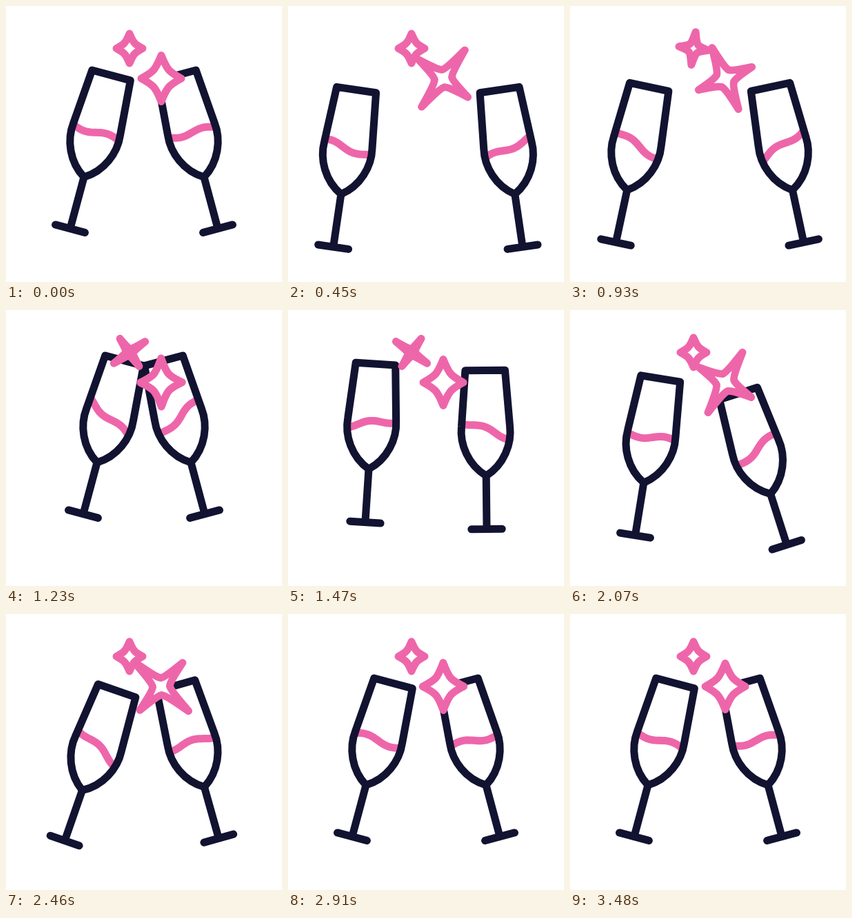
An HTML page for the animation above (3660 ms loop, 400 px wide and 400 px high).

```html
<!DOCTYPE html>
<html lang="en">
<head>
<meta charset="utf-8">
<title>Cheers</title>
<style>
  html, body { margin: 0; width: 100%; height: 100%; overflow: hidden; background: #fff; }
  svg { display: block; width: 100vw; height: 100vh; }
  path { stroke-width: 11; stroke-linecap: round; stroke-linejoin: round; fill: none; }
  .glass { stroke: #121331; }
  .wave { stroke: #ee66aa; }
  .star { stroke: #ee66aa; fill: #fff; }
</style>
</head>
<body>
<svg viewBox="0 0 400 400">
  <defs>
    <path id="bowl" d="M0 0C-26 -16 -38 -46 -35 -72L-28.8 -152.8H28.8L35 -72C38 -46 26 -16 0 0Z"/>
    <clipPath id="inside"><use href="#bowl"/></clipPath>
    <g id="glass" class="glass">
      <use href="#bowl"/>
      <path d="M0 0V77.3M-22.2 77.3H22.2"/>
    </g>
  </defs>
  <g id="left">
    <g clip-path="url(#inside)"><path class="wave"/></g>
    <use href="#glass"/>
  </g>
  <g transform="translate(400) scale(-1 1)">
    <g id="right">
      <g clip-path="url(#inside)"><path class="wave"/></g>
      <use href="#glass"/>
    </g>
  </g>
  <path id="big" class="star"/>
  <path id="small" class="star"/>
</svg>
<script>
const LOOP = 3660, STEP = 30, END = 3480;
const SPREAD = 555, CLINK = 1230, BACK = 1710, OVER = 2340, SETTLED = 2800;
const $ = id => document.getElementById(id);

const progress = (t, from, to) => Math.min(1, Math.max(0, (t - from) / (to - from)));
const mix = (a, b, k) => a + (b - a) * k;
const smooth = u => u * u * (3 - 2 * u);
const smoother = u => u * u * u * (u * (6 * u - 15) + 10);
const strike = u => Math.pow(u, 3.4);
const spin = u => {
  const half = v => Math.pow(2 * v, 2.4) / 2;
  return u < 0.5 ? half(u) : 1 - half(1 - u);
};

// The right glass is in mirrored space; it opens wider and swings back faster.
const glasses = [
  { id: "left", dir: 1, wide: 0, pace: 1, drop: 0, level: 4 },
  { id: "right", dir: -1, wide: 6, pace: 1.19, drop: 11, level: -2 }
];

function pose(g, t) {
  const rest = { x: 113, y: 248, angle: 15, tilt: g.level };
  const spread = { x: 75 - g.wide, y: 274, angle: 8, tilt: 12 + g.wide };
  const clink = { x: 132, y: 221, angle: 15, tilt: 28 };
  const back = { x: 102, y: 240 + g.drop, angle: -7.5, tilt: -46 };
  const over = { x: 110, y: 257 + g.drop, angle: 20, tilt: 30 };
  const move = (a, b, from, to, ease, turn = ease) => {
    const u = progress(t, from, to), k = ease(u), r = turn(u);
    return {
      x: mix(a.x, b.x, k), y: mix(a.y, b.y, k),
      angle: mix(a.angle, b.angle, r), tilt: mix(a.tilt, b.tilt, r)
    };
  };
  if (t < SPREAD) return move(rest, spread, 0, SPREAD, smoother);
  if (t < CLINK) return move(spread, clink, SPREAD, CLINK, strike, smooth);
  t = CLINK + (t - CLINK) * g.pace;
  if (t < BACK) return move(clink, back, CLINK, BACK, smooth);
  if (t < OVER) return move(back, over, BACK, OVER, smooth);
  return move(over, rest, OVER, SETTLED, smooth);
}

function drawGlass(g, t) {
  const p = pose(g, t), u = t / END;
  const phase = 8 * Math.PI * (u + 0.16 * Math.sin(Math.PI * u) ** 2);
  let d = "";
  for (let x = -60; x <= 60; x += 3) {
    const y = 3.4 * g.dir * Math.sin(2 * Math.PI * (x / 68 + 0.5) + g.dir * phase);
    d += (d ? "L" : "M") + x + " " + y.toFixed(2);
  }
  const node = $(g.id), wave = node.querySelector(".wave");
  node.setAttribute("transform", `translate(${p.x} ${p.y}) rotate(${p.angle})`);
  wave.setAttribute("d", d);
  wave.setAttribute("transform", `translate(0 -67) rotate(${p.tilt})`);
}

const stars = [
  { id: "big", x: 225, y: 105, rx: 29, ry: 33.5, waist: 11.7, pinch: 3.2, grow: 0.65, starts: [0, 1660] },
  { id: "small", x: 179, y: 61.5, rx: 19, ry: 21.5, waist: 7.6, pinch: 4.5, grow: 0.3, starts: [700] }
];

// Each spin is half a turn while the points stretch and the waist tightens.
function drawStar(s, t) {
  const start = s.starts.filter(v => v <= t).pop() ?? s.starts[0];
  const u = progress(t, start, start + 1300);
  const stretch = Math.max(0, Math.sin(Math.PI * u)) ** 1.5;
  const k = 1 + s.grow * stretch, rx = s.rx * k, ry = s.ry * k;
  const w = s.waist - s.pinch * stretch, near = w * 0.58, far = w * 1.42;
  const side = (sx, sy, fromTip) => fromTip
    ? `Q${sx * near} ${sy * far} ${sx * w} ${sy * w}Q${sx * far} ${sy * near} ${sx * rx} 0`
    : `Q${sx * far} ${sy * near} ${sx * w} ${sy * w}Q${sx * near} ${sy * far} 0 ${sy * ry}`;
  const node = $(s.id);
  node.setAttribute("d", `M0 ${-ry}` + side(1, -1, true) + side(1, 1, false)
    + side(-1, 1, true) + side(-1, -1, false) + "Z");
  node.setAttribute("transform", `translate(${s.x} ${s.y}) rotate(${180 * spin(u)})`);
}

function draw(t) {
  glasses.forEach(g => drawGlass(g, t));
  stars.forEach(s => drawStar(s, t));
}

const origin = performance.now();
function tick() {
  const t = (performance.now() - origin) % LOOP;
  draw(Math.min(END, Math.floor(t / STEP) * STEP));
  requestAnimationFrame(tick);
}
tick();
</script>
</body>
</html>
```
